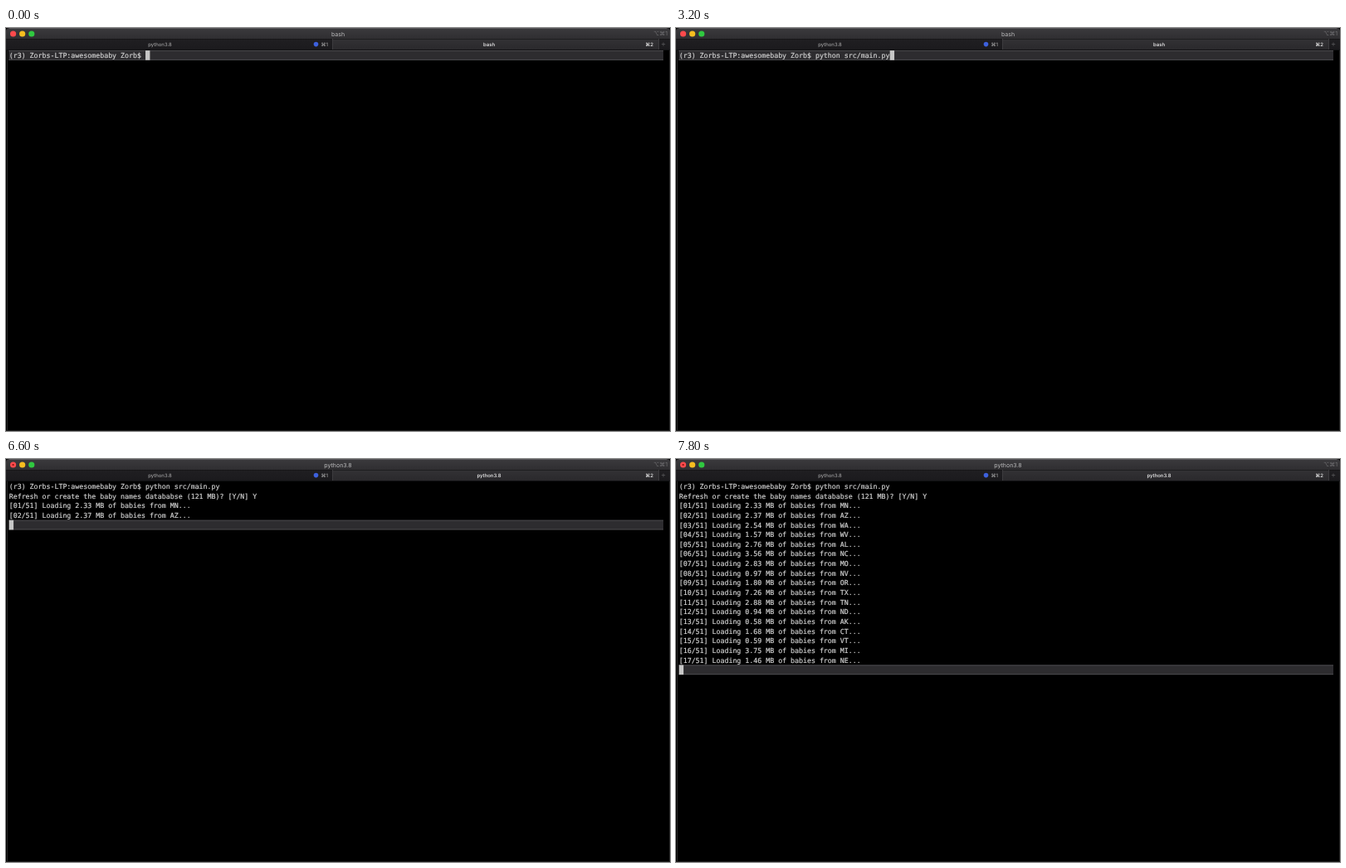
An HTML page with a canvas for the animation above (8000 ms loop, 800 px wide and 486 px high).

```html
<!DOCTYPE html>
<html lang="en">
<head>
<meta charset="utf-8">
<title>Terminal</title>
<style>
html, body { margin: 0; width: 100%; height: 100%; overflow: hidden; background: #000; }
canvas { display: block; }
</style>
</head>
<body>
<canvas id="stage" width="800" height="486"></canvas>
<script>
const ctx = document.getElementById('stage').getContext('2d');
const LOOP = 8000, LEFT = 3.7, TOP = 27.1, CELL = 4.98, ROW = 11.65;
const MONO = '8.272px "DejaVu Sans Mono", monospace';
const UI = 'Inter, sans-serif';

const PROMPT = '(r3) Zorbs-LTP:awesomebaby Zorb$ ';
const COMMAND = 'python src/main.py';
const QUESTION = 'Refresh or create the baby names datababse (121 MB)? [Y/N] ';
const LOADS = ('2.33 MN,2.37 AZ,2.54 WA,1.57 WV,2.76 AL,3.56 NC,2.83 MO,0.97 NV,1.80 OR,' +
  '7.26 TX,2.88 TN,0.94 ND,0.58 AK,1.68 CT,0.59 VT,3.75 MI,1.46 NE').split(',').map((item, i) => {
  const [size, state] = item.split(' ');
  return `[${String(i + 1).padStart(2, '0')}/51] Loading ${size} MB of babies from ${state}...`;
});

// Counts reached at successive 200 ms ticks
const TYPED = [1, 4, 6, 7, 9, 10, 11, 15, 16, 17, 18];
const LOADED = [2, 5, 7, 10, 11, 14, 17];
const countAt = (steps, start, t) =>
  t < start ? 0 : steps[Math.min(steps.length - 1, Math.floor((t - start) / 200))];

function rect(x, y, w, h, color) {
  ctx.fillStyle = color;
  ctx.fillRect(x, y, w, h);
}

function dot(x, y, r, color) {
  ctx.fillStyle = color;
  ctx.beginPath();
  ctx.arc(x, y, r, 0, 7);
  ctx.fill();
}

function label(text, x, y, font, color, align = 'center') {
  ctx.font = font;
  ctx.fillStyle = color;
  ctx.textAlign = align;
  ctx.fillText(text, x, y);
}

function shade(y, h, from, to) {
  const g = ctx.createLinearGradient(0, y, 0, y + h);
  g.addColorStop(0, from);
  g.addColorStop(1, to);
  return g;
}

function drawWindow(running) {
  const title = running ? 'python3.8' : 'bash';
  const idle = shade(13, 13, '#201f22', '#1b1a1d');
  rect(0, 0, 800, 486, '#000');
  ctx.fillStyle = shade(0, 13, '#3b3a3d', '#2f2e31');
  ctx.beginPath();
  ctx.roundRect(0, 0, 800, 13, [4, 4, 0, 0]);
  ctx.fill();
  rect(4, 0, 792, 1, '#59585b');

  rect(0, 13, 800, 13, idle);
  rect(394, 13, 392, 13, shade(13, 13, '#333235', '#2a292c'));
  rect(0, 13, 800, 0.6, '#111');
  rect(393, 13, 1, 13, '#3d3c3f');
  rect(786, 13, 1, 13, '#3d3c3f');
  rect(0, 26, 800, 1, '#111113');
  rect(1, 27, 0.7, 459, '#3a3a3a');
  rect(799, 27, 1, 459, '#222');
  rect(0, 485, 800, 1, '#1c1c1c');

  ['#fc4a4c', '#f6bd20', '#30c840'].forEach((c, i) => dot(8.6 + 11.1 * i, 7, 3.6, c));
  if (running) dot(8.6, 7, 1.1, '#7d1210');

  label(title, 400, 9.5, '7px ' + UI, '#bdbdbe');
  label('⌥⌘1', 797, 9.4, '7px ' + UI, '#737275', 'right');
  label('python3.8', 185.5, 21.8, '6px ' + UI, '#b2b2b3');
  dot(373.5, 19.6, 2.8, '#3d60dc');
  label('⌘1', 388, 21.8, '6px ' + UI, '#b2b2b3', 'right');
  label(title, 582, 21.8, '500 6px ' + UI, '#f4f4f4');
  label('⌘2', 780, 21.8, '500 6px ' + UI, '#f4f4f4', 'right');
  rect(789.8, 19.2, 4.4, 0.7, '#5c5b5e');
  rect(791.65, 17.35, 0.7, 4.4, '#5c5b5e');
}

function screenLines(t) {
  const lines = [PROMPT + COMMAND.slice(0, countAt(TYPED, 1200, t))];
  if (t < 3400) return lines;
  lines.push(t < 3800 ? '' : QUESTION + (t < 5600 ? '' : 'Y'));
  if (t >= 6600) lines.push(...LOADS.slice(0, countAt(LOADED, 6600, t)), '');
  return lines;
}

function drawText(lines) {
  const last = lines.length - 1;
  const y = TOP + last * ROW;
  rect(3, y, 789, ROW, '#2d2c2f');
  rect(3, y, 789, 0.8, '#525154');
  rect(3, y + ROW - 0.8, 789, 0.8, '#525154');
  rect(LEFT + lines[last].length * CELL, y, CELL + 0.4, ROW, '#c7c7c7');
  // A hairline outline gives the terminal text its heavier weight
  ctx.strokeStyle = '#d0d0d0';
  ctx.lineWidth = 0.2;
  lines.forEach((line, i) => {
    const base = TOP + i * ROW + 8.8;
    label(line, LEFT, base, MONO, '#d0d0d0', 'left');
    ctx.strokeText(line, LEFT, base);
  });
}

function frame(now) {
  const t = now % LOOP;
  ctx.textRendering = 'geometricPrecision';
  drawWindow(t >= 3600);
  drawText(screenLines(t));
  requestAnimationFrame(frame);
}
frame(0);
</script>
</body>
</html>
```
